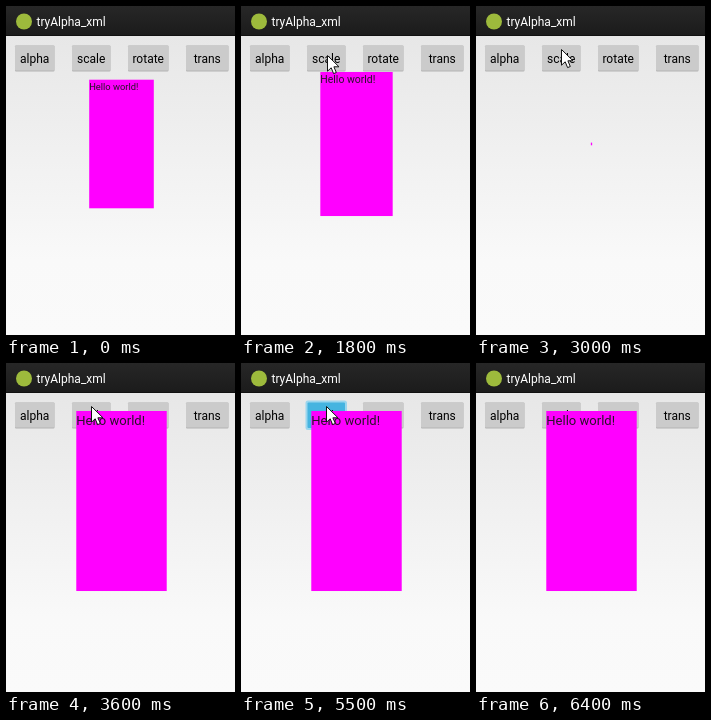
Recreate the animation shown at these times as an HTML page. Size 229 by 329 pixels, loop 7100 ms.

```html
<!DOCTYPE html>
<html lang="en">
<head>
<meta charset="utf-8">
<title>Scale animation</title>
<style>
  html, body { margin: 0; width: 100%; height: 100%; overflow: hidden; background: #fafafa; }
  svg { display: block; width: 229px; height: 329px; }
  text { font-family: Roboto, "Noto Sans", sans-serif; font-size: 12px; }
</style>
</head>
<body>
<svg viewBox="0 0 229 329">
  <defs>
    <linearGradient id="page" x2="0" y2="1">
      <stop offset="0" stop-color="#e7e7e7"/>
      <stop offset=".75" stop-color="#f9f9f9"/>
      <stop offset="1" stop-color="#fafafa"/>
    </linearGradient>
    <linearGradient id="bar" x2="0" y2="1">
      <stop offset="0" stop-color="#272727"/>
      <stop offset="1" stop-color="#1b1b1b"/>
    </linearGradient>
  </defs>
  <rect y="30" width="229" height="299" fill="url(#page)"/>
  <rect width="229" height="30" fill="url(#bar)"/>
  <rect y="29" width="229" height="1" fill="#111"/>
  <circle cx="18" cy="15.5" r="8" fill="#9dba3c"/>
  <text x="30.5" y="19.5" fill="#fff">tryAlpha_xml</text>
  <g id="buttons"></g>
  <g id="box">
    <rect x="-32.3" y="-64.3" width="64.6" height="128.6" fill="#f0f"/>
    <text x="-32.3" y="-54.3" fill="#2a122a" style="font-size:9.33px">Hello world!</text>
  </g>
  <path id="cursor" d="M.5.5V16.2L4.2 12.8L6.6 18.6L9.3 17.5L6.9 11.8H12Z"
        fill="#fff" stroke="#111" stroke-width="1" stroke-linejoin="round"/>
</svg>
<script>
const LOOP = 7100, STEP = 100, GROW = 600, FULL = 1.4;
const $ = id => document.getElementById(id);

// label, left, right, text centre
const buttons = [
  ['alpha', 9, 48.5, 28.7], ['scale', 66, 104.5, 85.2],
  ['rotate', 122, 162.5, 142.2], ['trans', 180, 222.5, 201.2]
];
$('buttons').innerHTML = buttons.map(([label, l, r, mid]) => `
  <rect x="${l}" y="39.5" width="${r - l}" height="26" rx="1" fill="#b3b3b3"/>
  <rect x="${l}" y="39.5" width="${r - l}" height="25" rx="1" fill="#cbcbcb"/>
  ${label === 'scale' ? `<g id="glow" opacity="0">
    <rect x="64.5" y="37.5" width="41.5" height="29.5" rx="2.5" fill="#9bd6ee"/>
    <rect x="66.5" y="39.5" width="37.5" height="25.5" rx="1" fill="#45b4e0"/></g>` : ''}
  <text x="${mid}" y="57" text-anchor="middle" fill="#000">${label}</text>`).join('');

const starts = [1377, 2954, 4308, 5580];
const glows = { 1300: 1, 2900: 1, 4100: 1, 4200: .5, 5500: 1 };

// time, x, y of the pointer tip
const moves = [
  [300, 155, 57], [400, 138, 56], [500, 118, 54], [600, 101, 52], [700, 91, 50],
  [800, 86, 49], [2500, 85.5, 46], [2600, 85, 43], [6200, 157, 64], [6300, 199, 73]
];
const HIDE = 6400;

const ease = p => (1 - Math.cos(Math.PI * p)) / 2;

function scaleAt(t) {
  const start = starts.filter(s => s <= t).pop();
  return start === undefined ? 1 : FULL * ease(Math.min(1, (t - start) / GROW));
}

function draw(t) {
  $('box').setAttribute('transform', `translate(115.5 138) scale(${scaleAt(t)})`);
  $('glow').setAttribute('opacity', glows[t] || 0);
  const at = t < HIDE && moves.filter(m => m[0] <= t).pop();
  $('cursor').setAttribute('visibility', at ? 'visible' : 'hidden');
  if (at) $('cursor').setAttribute('transform', `translate(${at[1]} ${at[2]})`);
}

const begin = performance.now();
function tick() {
  const t = (performance.now() - begin) % LOOP;
  draw(Math.floor(t / STEP) * STEP);
  requestAnimationFrame(tick);
}
tick();
</script>
</body>
</html>
```
